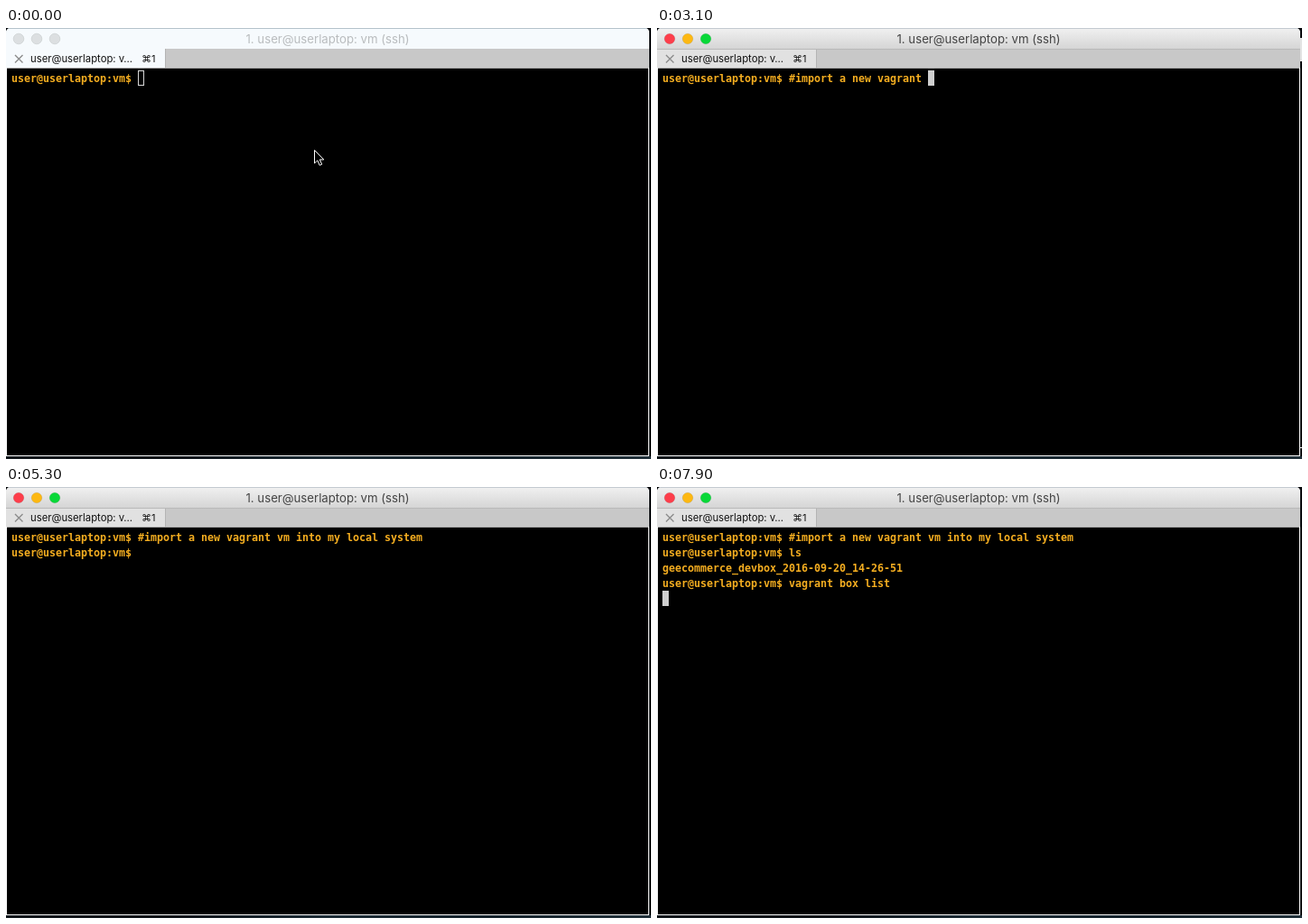
An HTML page with a canvas that plays this animation: 714x478 px, repeating every 8000 ms.

```html
<!DOCTYPE html>
<html lang="en">
<head>
<meta charset="utf-8">
<title>Terminal session</title>
<style>
  html, body { margin: 0; width: 100%; height: 100%; overflow: hidden; background: #0b1116; }
  canvas { display: block; }
</style>
</head>
<body>
<canvas id="stage" width="714" height="478"></canvas>
<script>
const ctx = document.getElementById('stage').getContext('2d');
const LOOP = 8000, FOCUS_AT = 100, BEAM_AT = 200;
const CELL = 7, LINE = 17, LEFT = 6, TOP = 47;
const PROMPT = 'user@userlaptop:vm$ ';
const AMBER = '#f5ae20';

// Each key press adds some text to the screen at a given time.
const keys = [];
const type = (start, step, text) =>
  [...text].forEach((char, i) => keys.push({ at: start + i * step, text: char }));
const press = (at, output) => keys.push({ at, text: '\n' + output });

type(1100, 70, '#import');
type(2000, 75, ' a new vagrant ');
type(3130, 65, 'vm into my local system');
press(5000, PROMPT);
type(5450, 150, 'ls');
press(5850, 'geecommerce_devbox_2016-09-20_14-26-51\n' + PROMPT);
type(6700, 60, 'vagrant box list');
press(7800, '');

function rect(color, x, y, w, h) {
  ctx.fillStyle = color;
  ctx.fillRect(x, y, w, h);
}

function label(text, x, y, font, color, align = 'left') {
  ctx.font = font;
  ctx.textAlign = align;
  ctx.fillStyle = color;
  ctx.fillText(text, x, y);
}

function stroke(path, color, width) {
  ctx.strokeStyle = color;
  ctx.lineWidth = width;
  ctx.stroke(new Path2D(path));
}

function gradient(x0, y0, x1, y1, ...colors) {
  const g = ctx.createLinearGradient(x0, y0, x1, y1);
  colors.forEach((c, i) => g.addColorStop(i / (colors.length - 1), c));
  return g;
}

function drawDesktop(t) {
  rect('#080b0e', 0, 0, 714, 478);
  rect(gradient(0, 0, 714, 0, '#10171b', '#0b1116', '#1d2d37', '#14222b', '#22323b'), 0, 475, 714, 3);
  if (t < 500 || t % 500 >= 250) return;
  // sliver of the window behind
  rect('#e4e4e4', 712, 11, 2, 26);
  rect('#ffffff', 712, 465, 2, 1);
  if (t > 5900) {
    rect('#333333', 712, 22, 2, 7);
    for (const y of [45, 63, 80, 97]) rect(AMBER, 712, y, 2, 3);
  }
}

function drawWindow(focused) {
  ctx.save();
  ctx.beginPath();
  ctx.roundRect(0, 0, 712, 475, [5, 5, 0, 0]);
  ctx.clip();
  rect('#ffffff', 0, 0, 712, 475);
  rect(focused ? gradient(0, 0, 0, 23, '#f1f1f1', '#d5d5d5') : '#f6fafd', 0, 0, 712, 23);
  rect(focused ? '#c3cad0' : '#b4c2cb', 0, 0, 712, 1);
  rect('#c8c8c8', 0, 23, 712, 21);
  rect(focused ? '#e1e1e1' : '#f6fafd', 0, 23, 176, 21);
  rect('#b4b4b4', 176, 23, 1, 21);
  if (focused) rect('#b9b9b9', 0, 23, 712, 1);
  rect('#000000', 1, 44, 710, 430);
  rect('#a5a5a5', 1, 44, 710, 1);
  ctx.restore();

  const lights = focused ? ['#fd3e4b', '#fdb812', '#08d838'] : ['#dcdfe1', '#dcdfe1', '#dcdfe1'];
  lights.forEach((color, i) => {
    ctx.beginPath();
    ctx.arc(14 + 20 * i, 12, 5.8, 0, 2 * Math.PI);
    ctx.fillStyle = color;
    ctx.fill();
    ctx.strokeStyle = focused ? 'rgba(0,0,0,.12)' : '#cbced0';
    ctx.lineWidth = 0.7;
    ctx.stroke();
  });

  label('1. user@userlaptop: vm (ssh)', 356, 17, '13.2px Inter, sans-serif',
    focused ? '#444444' : '#b9bcbe', 'center');
  stroke('M10 30l8.5 8.5M18.5 30l-8.5 8.5', '#8b8b8b', 1.4);
  label('user@userlaptop: v…', 27, 38, '11.3px Inter, sans-serif', '#111111');
  label('⌘1', 150, 38, '11px Inter, "DejaVu Sans", sans-serif', '#111111');
}

function drawScreen(t, focused) {
  const pressed = keys.filter(key => key.at <= t);
  const lines = (PROMPT + pressed.map(key => key.text).join('')).split('\n');
  const font = 'bold 11.63px "DejaVu Sans Mono", monospace';
  lines.forEach((line, i) => label(line, LEFT, TOP + 13 + LINE * i, font, AMBER));

  const x = LEFT + CELL * lines.at(-1).length;
  const y = TOP + LINE * (lines.length - 1);
  const lastKey = pressed.length ? pressed.at(-1).at : 400;
  if (!focused) {
    ctx.strokeStyle = '#d8d8d8';
    ctx.lineWidth = 1;
    ctx.strokeRect(x + 0.5, y + 0.5, CELL - 1, LINE - 1);
  } else if ((t - lastKey) % 600 < 300) {
    rect('#cfcfcf', x, y, CELL, LINE);
  }
}

function drawPointer(t) {
  if (t >= keys[0].at) return;
  if (t < BEAM_AT) {
    const arrow = 'M341.5 135.5v14.5l3.3-3.1 2.4 5.4 2.5-1.1-2.4-5.2h4.5z';
    ctx.fillStyle = '#000000';
    ctx.fill(new Path2D(arrow));
    stroke(arrow, '#ffffff', 1);
  } else {
    stroke('M338 129.5q3 0 3.5 2.5v10q-.5 2.5-3.5 2.5M345 129.5q-3 0-3.5 2.5v10q.5 2.5 3.5 2.5M339.5 138.5h4',
      '#e8e8e8', 1);
  }
}

function frame(now) {
  const t = now % LOOP;
  const focused = t >= FOCUS_AT;
  drawDesktop(t);
  drawWindow(focused);
  drawScreen(t, focused);
  drawPointer(t);
  requestAnimationFrame(frame);
}
requestAnimationFrame(frame);
</script>
</body>
</html>
```
